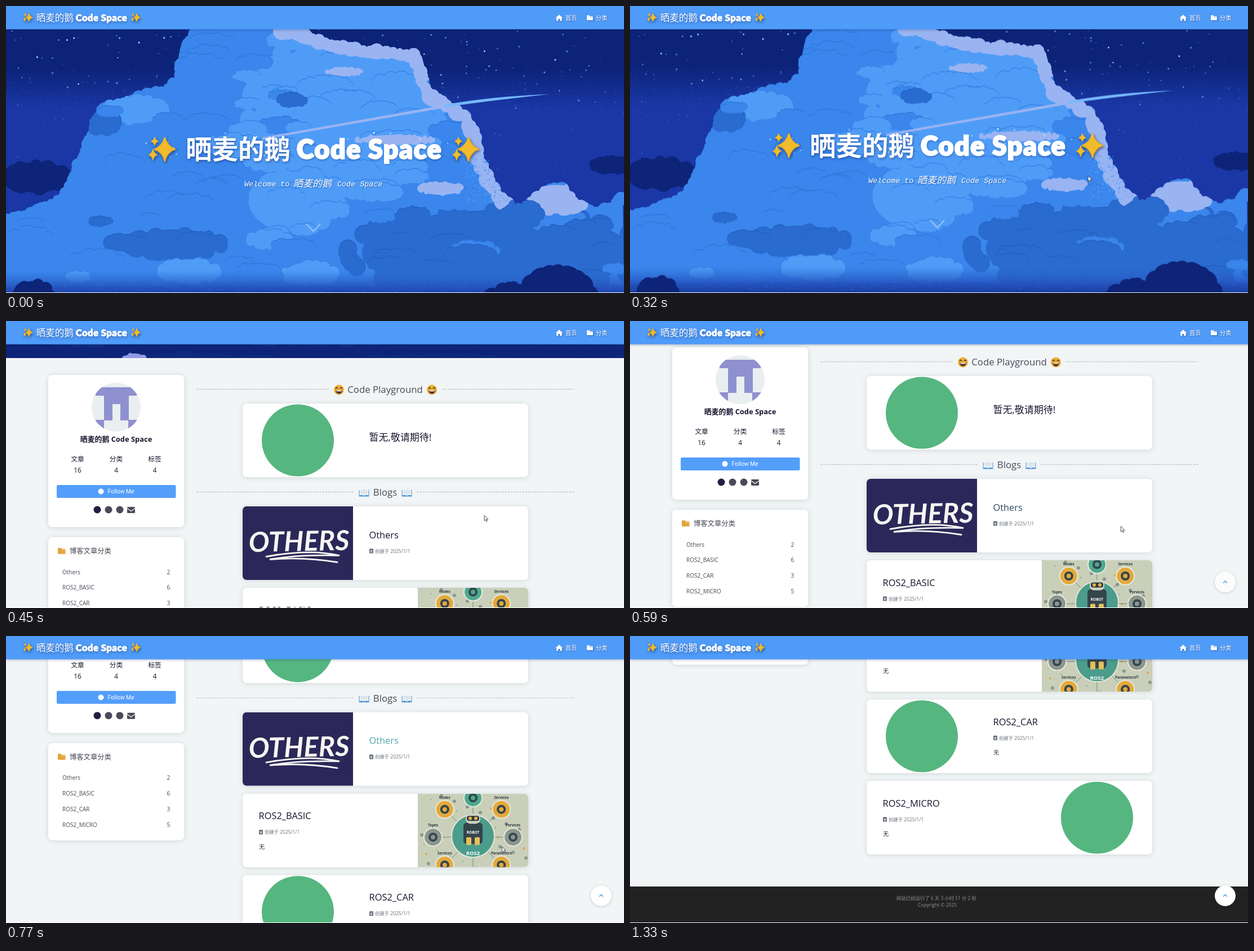
These frames come from a looping animation (1097x511 px, 1.46 s). An HTML page with a canvas:

```html
<!DOCTYPE html>
<html lang="zh">
<head>
<meta charset="utf-8">
<title>Code Space</title>
<style>
html, body { margin: 0; width: 100%; height: 100%; overflow: hidden; background: #f1f5f6; }
canvas { display: block; }
</style>
</head>
<body>
<canvas id="stage" width="1097" height="511"></canvas>
<script>
const W = 1097, LOOP = 1460, STEP = 30, HERO = 553;
const NAME = '晒麦的鹅', SITE = 'Code Space';
const CJK = '"Noto Sans CJK SC", "Noto Sans CJK JP", "Noto Sans CJK", sans-serif';
const UI = '"Open Sans", "Noto Sans", ' + CJK;
const BLUE = '#4f9bf8', GREEN = '#56b680', INK = '#16162e', GOLD = '#f2bb2c', GREY = '#4b4a58';
const SHADE = '#2a6bd0', MID = '#3a86ec', LIGHT = '#4f9cf7', LILAC = '#9ab4f2', NAVY = '#0d2478';
const CONTOUR = { [SHADE]: '#245fc2', [MID]: '#2f76da', [LIGHT]: '#3580e6' };
const screen = document.getElementById('stage').getContext('2d');
let g = screen;

let seed = 7;
const rnd = (a = 1, b = 0) => {
  seed = (seed * 16807) % 2147483647;
  return b + (a - b) * seed / 2147483647;
};

const progress = (t, from, to) => Math.min(1, Math.max(0, (t - from) / (to - from)));
const ease = (t, from, to) => (1 - Math.cos(Math.PI * progress(t, from, to))) / 2;

// Smooth monotone curve through [position, value] keys.
function track(keys) {
  const slope = i => (keys[i + 1][1] - keys[i][1]) / (keys[i + 1][0] - keys[i][0]);
  const tangent = i => {
    if (i === 0 || i === keys.length - 1) return 0;
    const a = slope(i - 1), b = slope(i);
    return a * b > 0 ? 2 * a * b / (a + b) : 0;
  };
  return t => {
    if (t <= keys[0][0]) return keys[0][1];
    const i = keys.findIndex(k => k[0] >= t) - 1;
    if (i < 0) return keys[keys.length - 1][1];
    const [t0, v0] = keys[i], [t1, v1] = keys[i + 1], d = t1 - t0, u = (t - t0) / d, w = 1 - u;
    return v0 * w * w * (1 + 2 * u) + v1 * u * u * (3 - 2 * u) + d * u * w * (tangent(i) * w - tangent(i + 1) * u);
  };
}

const firstFlick = track([[290, 0], [320, 6.5], [380, 176], [440, 487], [530, 536]]);
const scrollAt = t => firstFlick(t) + 458 * ease(t, 690, 900);
const pointer = [[50, 1056, 518], [300, 813, 302], [380, 815, 308], [440, 849, 346],
  [650, 876, 370], [890, 886, 382], [980, 1034, 481], [1010, 1060, 516]];
const pointerX = track(pointer.map(([t, x]) => [t, x]));
const pointerY = track(pointer.map(([t, , y]) => [t, y]));
const zoomAt = t => 1 + .05 * ease(t, 870, 950) * (1 - ease(t, 950, 1330));

// Drawing helpers
function text(str, x, y, size, { color = INK, weight = 400, align = 'left', font = UI, style = '' } = {}) {
  g.font = `${style} ${weight} ${size}px ${font}`;
  g.fillStyle = color;
  g.textAlign = align;
  g.fillText(str, x, y);
}
function disc(x, y, r, color) {
  g.fillStyle = color;
  g.beginPath();
  g.arc(x, y, r, 0, 7);
  g.fill();
}
function rect(x, y, w, h, color, r = 0) {
  g.fillStyle = color;
  g.beginPath();
  g.roundRect(x, y, w, h, r);
  g.fill();
}
function line(d, color, width) {
  g.strokeStyle = color;
  g.lineWidth = width;
  g.stroke(new Path2D(d));
}
function shape(d, color) {
  g.fillStyle = color;
  g.fill(new Path2D(d));
}
function shadow(color, blur, dy = 0, dx = 0) {
  g.shadowColor = color;
  g.shadowBlur = blur;
  g.shadowOffsetX = dx;
  g.shadowOffsetY = dy;
}
function scoped(fn) {
  g.save();
  fn();
  g.restore();
}
function specks(count, x, y, w, h, size, color) {
  while (count--) {
    const s = rnd(size, .5);
    rect(x + rnd(w), y + rnd(h), s, s, color);
  }
}
function fade(y0, y1, ...colors) {
  const f = g.createLinearGradient(0, y0, 0, y1);
  colors.forEach((c, i) => f.addColorStop(i / (colors.length - 1), c));
  return f;
}

// Upper outline of the big cloud
const skyline = track([[0, 370], [85, 338], [135, 245], [165, 178], [245, 150], [298, 126], [312, 60], [345, 34],
  [500, 36], [600, 64], [735, 80], [752, 140], [835, 206], [850, 275], [908, 350], [975, 312], [1045, 358], [W, 333]]);

// Visits points lying `depth` inside the outline, evenly along its length.
function alongSkyline(from, to, depth, gap, visit) {
  for (let x = from; x < to;) {
    const slope = (skyline(x + 1) - skyline(x - 1)) / 2, len = Math.hypot(1, slope);
    visit(x - slope / len * depth, skyline(x) + depth / len);
    x += gap * rnd(1.4, .6) / len;
  }
}

// An ellipse ringed with random lobes, with a darker contour above if given.
function billow(x, y, w, h, color, contour = CONTOUR[color]) {
  const lobes = Array.from({ length: 10 + w / 5 }, () => [rnd(2 * Math.PI), Math.min(16, h * rnd(.55, .25))]);
  const layer = (dy, c) => {
    g.fillStyle = c;
    g.beginPath();
    g.ellipse(x, y + dy, w * .85, h * .85, 0, 0, 7);
    g.fill();
    lobes.forEach(([a, r]) => disc(x + (w - r) * Math.cos(a), y + dy + (h - r) * Math.sin(a), r, c));
  };
  if (contour) layer(-1.5, contour);
  layer(0, color);
}

function tone(x, y) {
  const pick = rnd();
  if (x > 640 && y > 350) return pick < .75 ? SHADE : MID;
  if (Math.hypot(x - 590, y - 220) < 190) return pick < .9 ? LIGHT : MID;
  if (y > 310 && pick < .3) return SHADE;
  return pick < .85 ? MID : LIGHT;
}

function paintCloud() {
  const mass = new Path2D();
  mass.moveTo(0, HERO);
  for (let x = 0; x <= W; x += 3) mass.lineTo(x, skyline(x) + 6);
  mass.lineTo(W, HERO);
  alongSkyline(0, W, 9, 9, (x, y) => {
    const r = rnd(13, 6);
    mass.moveTo(x + r, y);
    mass.arc(x, y, r, 0, 7);
  });
  g.clip(mass);
  rect(0, 0, W, HERO, MID);

  billow(600, 190, 185, 155, LIGHT);
  billow(520, 345, 90, 60, LIGHT);
  billow(870, 440, 280, 88, SHADE);
  billow(300, 425, 95, 30, SHADE);
  billow(230, 185, 60, 28, LIGHT);
  billow(172, 207, 34, 26, SHADE);
  for (let y = 55; y < 485; y += 3.5) {
    const x = rnd(W), w = rnd(52, 18);
    if (y > skyline(x) + w * .4) billow(x, y, w, w * .45, tone(x, y));
  }
  billow(508, 168, 28, 14, SHADE);
  billow(325, 472, 58, 24, LIGHT);
  billow(540, 476, 52, 24, LIGHT);

  // Sunlit rim and wisps
  alongSkyline(495, 905, 9, 5, (x, y) => disc(x + rnd(5, -5), y, rnd(17, 8), LILAC));
  billow(600, 117, 34, 9, LILAC);
  billow(690, 238, 72, 10, LILAC);
  billow(772, 325, 42, 13, LILAC);
  billow(978, 344, 62, 30, LILAC);
  billow(915, 372, 42, 27, SHADE);
  specks(450, 815, 265, 75, 85, 2, LIGHT);
}

function paintSky() {
  const layer = document.createElement('canvas');
  layer.width = W;
  layer.height = HERO;
  g = layer.getContext('2d');
  rect(0, 0, W, HERO, fade(110, 185, '#0c2378', '#1a37a5'));
  specks(900, 0, 150, W, 35, 1.5, '#2c5ccb99');
  specks(260, 0, 42, W, 280, 1.8, '#3c78dc');
  for (let i = 0; i < 130; i++) disc(rnd(W), 42 + rnd(140), rnd(1.6, .5), i % 3 ? '#4f93ea' : '#a9d4ff');
  billow(55, 305, 62, 32, NAVY);
  billow(1085, 283, 50, 18, NAVY);
  scoped(paintCloud);
  shape('M455 234L780 176L780 181L455 238Z', LILAC);
  shape('M778 176Q860 161 965 157Q880 166 778 180Z', '#75b8ff');

  rect(0, 470, W, HERO - 470, fade(470, 535, '#2a6bd000', '#2450bb', '#0d2a7c'));
  specks(1200, 0, 480, W, 30, 2, '#3a7be066');
  billow(978, 525, 75, 65, NAVY);
  billow(905, 522, 60, 32, NAVY);
  billow(50, 515, 38, 30, NAVY);
  for (let x = 0; x < W; x += 9) disc(x, 538 + 6 * Math.sin(x / 70), rnd(15, 7), NAVY);
  billow(228, 554, 22, 11, '#8f9be6');

  // Glints on both sides of the title
  for (let i = 0; i < 40; i++)
    disc(540 + (i % 2 ? 1 : -1) * rnd(295, 60), rnd(270, 225), rnd(1.5, .6), i % 5 ? '#9cc8ff' : '#fff');
  g = screen;
  return layer;
}

function star(x, y, rx, ry) {
  const bend = .24;
  g.beginPath();
  g.moveTo(x, y - ry);
  for (let i = 1; i <= 4; i++) {
    const a = i * Math.PI / 2, b = a - Math.PI / 4;
    g.quadraticCurveTo(x + Math.sin(b) * rx * bend * 1.41, y - Math.cos(b) * ry * bend * 1.41,
      x + Math.sin(a) * rx, y - Math.cos(a) * ry);
  }
  g.lineJoin = 'round';
  g.lineWidth = rx * .16;
  g.strokeStyle = g.fillStyle = GOLD;
  g.stroke();
  g.fill();
}
function sparkles(x) {
  star(x + 30, -17, 18, 21);
  star(x + 12, -31, 6.5, 7.5);
  star(x + 9, -7, 7.5, 10);
}
function brand(x, y, scale, weight) {
  scoped(() => {
    g.translate(x, y);
    g.scale(scale, scale);
    shadow('rgba(10,25,80,.45)', 4, 2, 1);
    sparkles(0);
    sparkles(539);
    text(NAME, 67, 0, 46.5, { color: '#fff', weight, font: CJK });
    g.letterSpacing = '1.5px';
    text(SITE, 264, 0, 46.5, { color: '#fff', weight: 900, font: 'Lato, Inter, sans-serif' });
    shadow('transparent', 0);
    g.strokeStyle = '#fff';
    g.lineWidth = 2.4;
    g.strokeText(SITE, 264, 0);
  });
}

function folder(x, y, w, color) {
  const h = w * .8;
  rect(x, y, w * .48, h * .5, color, 1);
  rect(x, y + h * .17, w, h * .12, color, .5);
  rect(x, y + h * .34, w, h * .66, color, 1);
}
function grin(x, y) {
  disc(x, y, 9, '#f0ae35');
  line(`M${x - 6} ${y - 2}q2 -4 4 0M${x + 2} ${y - 2}q2 -4 4 0`, '#4b3428', 1.4);
  shape(`M${x - 6} ${y + 1}h12q-1 6 -6 6t-6 -6z`, '#4b3428');
  rect(x - 4.5, y + 1, 9, 1.8, '#fff');
}
function book(x, y) {
  rect(x - 9, y - 5, 18, 12, '#4a93d8', 1);
  shape(`M${x - 8} ${y - 6}q5 -2 8 1q3 -3 8 -1v11q-5 -2 -8 1q-3 -3 -8 -1z`, '#eef3f8');
  line(`M${x} ${y - 5}v11M${x - 6} ${y - 3}h4m-4 3h4M${x + 2} ${y - 3}h4m-4 3h4`, '#a9b8c8', .8);
}
function heading(label, y, half, icon) {
  scoped(() => {
    g.setLineDash([3.2, 2]);
    line(`M338 ${y}H${673.5 - half}M${673.5 + half} ${y}H1009`, '#bcc2c0', 1.3);
  });
  icon(673.5 - half + 18, y + 1);
  icon(673.5 + half - 18, y + 1);
  text(label, 673, y + 6.5, 16.8, { color: '#4c4958', align: 'center' });
}
function panel(x, y, w, h) {
  scoped(() => {
    shadow('rgba(40,60,70,.16)', 10, 1);
    rect(x, y, w, h, '#fff', 7);
  });
}
function picture(x, y, fn) {
  scoped(() => {
    g.beginPath();
    g.roundRect(420, y, 507, 131, 7);
    g.clip();
    g.beginPath();
    g.rect(x, y, 196, 131);
    g.clip();
    fn(x + 98, y + 65.5);
  });
}
function post(y, title, { right = false, note = '无', art, color = INK }) {
  const x = right ? 449 : 645, base = y + (note ? 45.5 : 56.5), dateY = base + 26;
  panel(420, y, 507, 131);
  picture(right ? 731 : 420, y, art);
  text(title, x - .5, base, 16.4, { color });
  rect(x, dateY - 7, 7, 8, '#5b6270', 1);
  line(`M${x + 1} ${dateY - 4}h5m-5 2.4h5m-2.5 -2.4v4`, '#fff', .8);
  text('创建于 2025/1/1', x + 10, dateY, 8.4, { color: '#6a7078' });
  if (note) text(note, x, base + 52.5, 10.3, { color: '#2c3136' });
}
const emblem = (scale = 1) => (x, y) => disc(x, y, 64 * scale, GREEN);

function othersArt(x, y) {
  rect(x - 98, y - 66, 196, 132, '#2c2759');
  g.translate(x, y);
  g.lineCap = 'round';
  scoped(() => {
    g.rotate(-.02);
    text('OTHERS', 2, 14, 49, { color: '#f6f6f2', weight: 700, align: 'center', style: 'italic', font: 'Lato, Inter, sans-serif' });
  });
  line('M-56 24Q20 10 74 22Q0 20 -50 29Q10 24 70 34', '#f6f6f2', 2.8);
}
function robotArt(x, y) {
  rect(x - 98, y - 66, 196, 132, '#c9cfb9');
  const tints = ['#4fa98f', '#e3a93c', '#8b9690', '#e3a93c'];
  for (let i = 0; i < 40; i++)
    disc(x - 98 + (i * 73) % 196, y - 65 + (i * 47) % 131, 1 + i % 3, tints[i % 3]);
  // Gears in a ring, the lowest place left free
  ['Nodes', 'Services', 'Pervices', 'Parameters', '', 'Services', 'Topes', 'Nodes'].forEach((label, i) => {
    const a = i * Math.PI / 4, cx = x + 71 * Math.sin(a), cy = y + 12 - 70 * Math.cos(a);
    line(`M${x} ${y + 12}L${cx} ${cy}`, '#6f8a85', 1);
    if (!label) return;
    disc(cx, cy, 17, '#e9ead9');
    disc(cx, cy, 15, tints[i % 4]);
    disc(cx, cy, 8, '#34454c');
    disc(cx, cy, 4, tints[i % 4]);
    text(label, cx, cy - 19, 6.3, { color: '#2d3a42', weight: 700, align: 'center' });
  });
  disc(x, y + 10, 39, '#e4e7d6');
  disc(x, y + 10, 37, '#4b9c8c');
  rect(x - 17, y - 14, 34, 38, '#34454c', 6);
  rect(x - 13, y - 30, 26, 18, '#cfd3c4', 8);
  rect(x - 11, y - 26, 22, 9, '#2d3a42', 4);
  for (const side of [-1, 1]) {
    disc(x + side * 5, y - 21.5, 3, '#e9b23f');
    rect(x + side * 7.5 - 4.5, y + 12, 9, 14, '#e3c05a', 2);
  }
  const white = { color: '#fff', weight: 700, align: 'center' };
  text('ROBOT', x, y + 6, 6.5, white);
  text('ROS2', x, y + 44, 9.5, white);
}

function profile() {
  panel(75, 583, 241, 271);
  scoped(() => {
    disc(195.5, 640.5, 43.5, '#e9eef0');
    g.clip();
    ['11111', '01110', '01010', '01010', '10001'].forEach((row, r) =>
      [...row].forEach((on, c) => +on && rect(Math.round(159 + c * 14.5), Math.round(605 + r * 14.5), 15, 15, '#8f90d0')));
  });
  const mid = { align: 'center' };
  text(`${NAME} ${SITE}`, 195.5, 702, 12.9, { weight: 700, align: 'center' });
  [['文章', 16], ['分类', 4], ['标签', 4]].forEach(([label, n], i) => {
    text(label, 127 + i * 68.5, 737, 11.8, mid);
    text(n, 127 + i * 68.5, 757, 11.8, mid);
  });
  rect(90, 779, 211.5, 23, '#539efb', 2.5);
  disc(168.5, 790.5, 5, '#fff');
  text('Follow Me', 204, 794, 10.3, { color: '#fff', align: 'center', font: 'Roboto, "Liberation Sans", sans-serif' });
  for (let i = 0; i < 3; i++) disc(162 + i * 20, 823, 6.5, i ? GREY : '#211f42');
  rect(215, 818, 14, 11, GREY, 1.5);
  line('M215 820.5L222 825.5L229 820.5', '#fff', 1.2);

  panel(75, 872, 241, 173);
  folder(92, 891, 13.5, '#e5a43a');
  text('博客文章分类', 113, 901, 12.3, { color: '#454450' });
  [['Others', 2], ['ROS2_BASIC', 6], ['ROS2_CAR', 3], ['ROS2_MICRO', 5]].forEach(([label, n], i) => {
    const y = 937.5 + i * 27.8;
    text(label, 100, y, 10, { color: GREY });
    text(n, 291.5, y, 10.3, { color: GREY, align: 'right' });
  });
}

function hero() {
  g.drawImage(sky, 0, 0);
  brand(252, 272, 1, 700);
  scoped(() => {
    shadow('rgba(10,25,80,.4)', 2, 1, 1);
    const pen = { color: '#fff', style: 'italic', font: '"Liberation Mono", "DejaVu Sans Mono", monospace' };
    text('Welcome to', 423, 321, 13.4, pen);
    text(NAME, 510, 322, 17, { ...pen, font: CJK });
    text(SITE, 588, 321, 13.4, pen);
  });
  line('M533 388L545.5 401L558 388', 'rgba(220,230,255,.5)', 2.5);
}

function page(t) {
  hero();
  rect(0, HERO, W, 1000, '#f1f5f6');
  profile();
  heading('Code Playground', 608.5, 100.5, grin);
  panel(420, 634, 507, 131);
  picture(420, 634, emblem());
  text('暂无,敬请期待!', 644.5, 699.5, 17);
  heading('Blogs', 791.5, 56, book);
  const hover = ease(t, 550, 650), mix = (a, b) => Math.round(a + (b - a) * hover);
  post(817, 'Others', { note: '', art: othersArt, color: `rgb(${mix(22, 88)},${mix(22, 166)},${mix(46, 176)})` });
  post(962, 'ROS2_BASIC', { right: true, art: robotArt });
  post(1107, 'ROS2_CAR', { art: emblem() });
  post(1252, 'ROS2_MICRO', { right: true, art: emblem(zoomAt(t)) });

  rect(0, 1440, W, 100, '#222');
  const grey = { color: '#8f8f8f', align: 'center' };
  text(`网站已经运行了 6 天 3 小时 51 分 ${t < 1200 ? 1 : 2} 秒`, 544, 1463.5, 8.4, grey);
  text('Copyright © 2025', 545.5, 1476, 8.5, grey);
}

function navbar() {
  scoped(() => {
    shadow('rgba(0,20,80,.25)', 4, 1);
    rect(0, 0, W, 41.5, BLUE);
  });
  brand(30, 26.5, .355, 400);
  scoped(() => {
    shadow('rgba(10,25,80,.45)', 2, 1, 1);
    shape('M982 15.5l6.5 5.8h-1.7v5.2h-3.3v-3.5h-3v3.5h-3.3v-5.2h-1.7z', '#fff');
    folder(1031, 16.5, 11, '#fff');
    text('首页', 993, 25, 10.3, { color: '#fff', weight: 500 });
    text('分类', 1047, 25, 10.3, { color: '#fff', weight: 500 });
  });
}

function overlay(t) {
  const shown = ease(t, 460, 620);
  scoped(() => {
    g.globalAlpha = shown;
    g.translate(1056.5, 462.5 + (1 - shown) * 28);
    scoped(() => {
      shadow('rgba(0,0,0,.18)', 5, 1);
      disc(0, 0, 18.5, '#fff');
    });
    line('M-3.5 1.5L0 -2L3.5 1.5', BLUE, 1.5);
  });
  scoped(() => {
    g.translate(pointerX(t), pointerY(t));
    const arrow = 'M0 0V9.6L2.2 7.6L3.7 11L5.3 10.3L3.8 7H6.8Z';
    shape(arrow, '#fff');
    line(arrow, '#20243a', .8);
  });
}

const sky = paintSky();

function frame() {
  // The picture advances in steps, as a screen recording does.
  const t = Math.floor((performance.now() % LOOP + 10) / STEP) * STEP - 10;
  scoped(() => {
    g.translate(0, -scrollAt(t));
    page(t);
  });
  navbar();
  overlay(t);
  rect(0, 510, W, 1, '#fff');
  requestAnimationFrame(frame);
}
frame();
</script>
</body>
</html>
```
